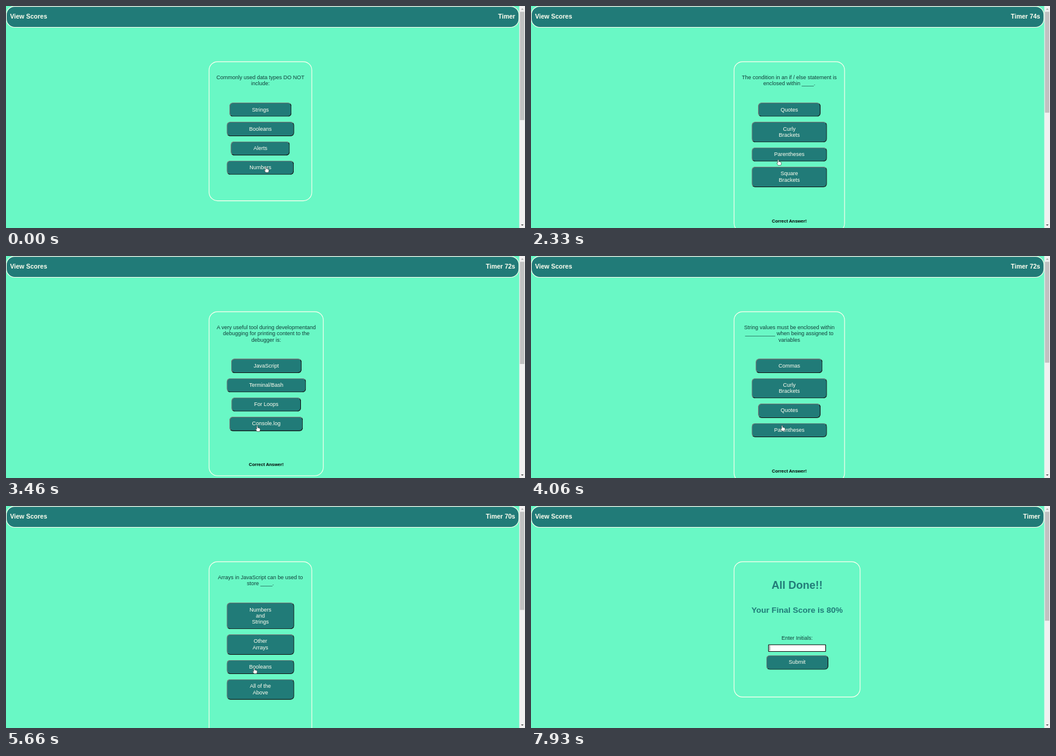
Recreate the animation shown at these times as an HTML page. Size 864 by 370 pixels, loop 8000 ms.

```html
<!DOCTYPE html>
<html lang="en">
<head>
<meta charset="utf-8">
<title>Code quiz</title>
<style>
  html, body { margin: 0; width: 100%; height: 100%; overflow: hidden; background: #69f8c5; }
  #page {
    position: absolute; width: 1536px; height: 658px; overflow: hidden;
    transform: scale(.5625); transform-origin: 0 0;
    font: 16px/18.4px "Liberation Sans", Arial, sans-serif; color: #123f3b; text-align: center;
  }
  h1, h2, h5, p { margin: 0; }
  nav, #card { position: absolute; box-sizing: border-box; border: 2px solid ivory; border-radius: 26px; }
  nav {
    width: 1519px; height: 64px; padding: 0 10px; background: #217b78; color: ivory;
    display: flex; justify-content: space-between; font: bold 18.72px/60px "Liberation Sans", Arial, sans-serif;
  }
  #card { left: 600px; top: 164px; width: min-content; padding: 37px 50.5px 24px; }
  #card.done { padding-bottom: 28px; }
  p { width: 0; min-width: calc(100% + 80px); margin: 0 -40px 46px; }
  .button {
    width: fit-content; margin: 15px auto 0; padding: 10px 65px; border: 2px solid;
    border-color: #767676 #151515 #151515 #767676; border-radius: 11px;
    background: #217b78; color: ivory;
  }
  .button.pressed { border-color: #151515 #767676 #767676 #151515; }
  h1, h2 { color: #217b78; white-space: nowrap; }
  h1 { margin-top: 14px; font-size: 32px; line-height: 37px; }
  h2 { margin: 40px 0 60px; font-size: 24px; line-height: 28px; }
  h5 { margin-top: 92px; font-size: 13.28px; line-height: 15px; color: #000; white-space: nowrap; }
  h5:empty { margin-top: 52px; }
  .field {
    box-sizing: border-box; width: 171px; height: 22px; margin: 10px auto -5px;
    border: 1px solid #858585; background: #fff; position: relative;
  }
  .field.focus { border: 2px solid #101010; border-radius: 2px; }
  .field.focus::after { content: ""; position: absolute; left: 2px; top: 1px; width: 1px; height: 16px; background: #000; }
  #bar { position: absolute; right: 0; top: 0; width: 17px; height: 658px; background: #f1f1f1; }
  #bar i { position: absolute; left: 2px; top: 17px; width: 13px; background: #c1c1c1; }
  #bar::before, #bar::after { content: ""; position: absolute; left: 4.5px; border: 4px solid transparent; }
  #bar::before { top: 3px; border-bottom-color: #a3a3a3; }
  #bar::after { bottom: 3px; border-top-color: #505050; }
  #pointer { position: absolute; left: 0; top: 0; overflow: visible; }
</style>
</head>
<body>
<div id="page">
  <nav><span>View Scores</span><span id="timer"></span></nav>
  <div id="card"></div>
  <div id="bar"><i id="thumb"></i></div>
</div>
<svg id="pointer" width="10" height="12" stroke="#222" stroke-width=".6">
  <path id="hand" fill="#fff" transform="translate(.7 .8) scale(.9)" d="M-1 1Q0-.6 1 1V4Q2.2 3.4 2.6 4.4Q3.8 4 4.1 4.9Q5.5 4.6 5.5 6V8L4.5 10.8H-.3L-2.9 7Q-3 5.4-1 6.6Z"/>
  <path id="beam" fill="none" d="M-1.5-4H1.5M0-4V4M-1.5 4H1.5"/>
</svg>
<script>
const LOOP = 8000;
const $ = id => document.getElementById(id);

// start and press in ms, thumb end in stage pixels, index of the chosen answer
const scenes = [
  { start: 0, press: 1600, thumb: 190, pick: 2,
    ask: "Commonly used data types DO NOT include:",
    answers: ["Strings", "Booleans", "Alerts", "Numbers"] },
  { start: 1660, press: 2530, thumb: 178, pick: 2,
    ask: "The condition in an if / else statement is enclosed within ____.",
    answers: ["Quotes", "Curly Brackets", "Parentheses", "Square Brackets"] },
  { start: 2600, press: 3795, thumb: 180, pick: 3,
    ask: "A very useful tool during developmentand debugging for printing content to the debugger is:",
    answers: ["JavaScript", "Terminal/Bash", "For Loops", "Console.log"] },
  { start: 3860, press: 4995, thumb: 178, pick: 2,
    ask: "String values must be enclosed within __________ when being assigned to variables",
    answers: ["Commas", "Curly Brackets", "Quotes", "Parentheses"] },
  { start: 5060, press: 5795, thumb: 173, pick: 2,
    ask: "Arrays in JavaScript can be used to store ____.",
    answers: ["Numbers and Strings", "Other Arrays", "Booleans", "All of the Above"] },
  { start: 6455, thumb: 191 }
];

// pointer stops: time, x, y
const stops = [
  [0, 432, 267], [700, 432, 267], [860, 428, 263], [950, 428, 263], [1460, 404.5, 238.5],
  [1950, 404.5, 238.5], [2330, 411, 255], [2750, 411, 255], [3260, 417.5, 282],
  [4000, 417.5, 282], [4530, 413.5, 260], [5150, 413.5, 260], [5660, 412.5, 269],
  [7340, 412.5, 269], [7750, 403, 238], [LOOP, 403, 238]
];

const button = label => `<div class="button">${label}</div>`;

function showScene(scene) {
  const card = $("card");
  card.className = scene.ask ? "" : "done";
  card.innerHTML = scene.ask
    ? `<p>${scene.ask}</p>${scene.answers.map(button).join("")}<h5>${scene.start ? "Correct Answer!" : ""}</h5>`
    : `<h1>All Done!!</h1><h2>Your Final Score is 80%</h2>Enter Initials:<div class="field"></div>${button("Submit")}<h5></h5>`;
  $("thumb").style.height = scene.thumb / .5625 - 17 + "px";
}

function pointerAt(t) {
  const i = stops.findIndex(stop => stop[0] > t);
  const [t0, x0, y0] = stops[i - 1], [t1, x1, y1] = stops[i];
  const u = (t - t0) / (t1 - t0), k = u * u * (3 - 2 * u);
  return [x0 + (x1 - x0) * k, y0 + (y1 - y0) * k];
}

let shown;
function frame() {
  const t = performance.now() % LOOP;
  const scene = scenes.findLast(s => t >= s.start);
  if (scene !== shown) showScene(shown = scene);

  const running = t >= 460 && t < 6455;
  $("timer").textContent = running ? `Timer ${75 - Math.floor((t - 455) / 1000)}s` : "Timer";

  if (scene.ask) {
    const pressed = t >= scene.press && t < scene.press + 65;
    document.querySelectorAll(".button")[scene.pick].classList.toggle("pressed", pressed);
  } else {
    document.querySelector(".field").classList.toggle("focus", t >= 7800);
  }

  const [x, y] = pointerAt(t);
  const overField = t > 7000 && y < 244;
  $("pointer").style.transform = `translate(${x}px, ${y}px)`;
  $("pointer").style.display = t < 7900 ? "" : "none";
  $("hand").style.display = overField ? "none" : "";
  $("beam").style.display = overField ? "" : "none";
  requestAnimationFrame(frame);
}
frame();
</script>
</body>
</html>
```
